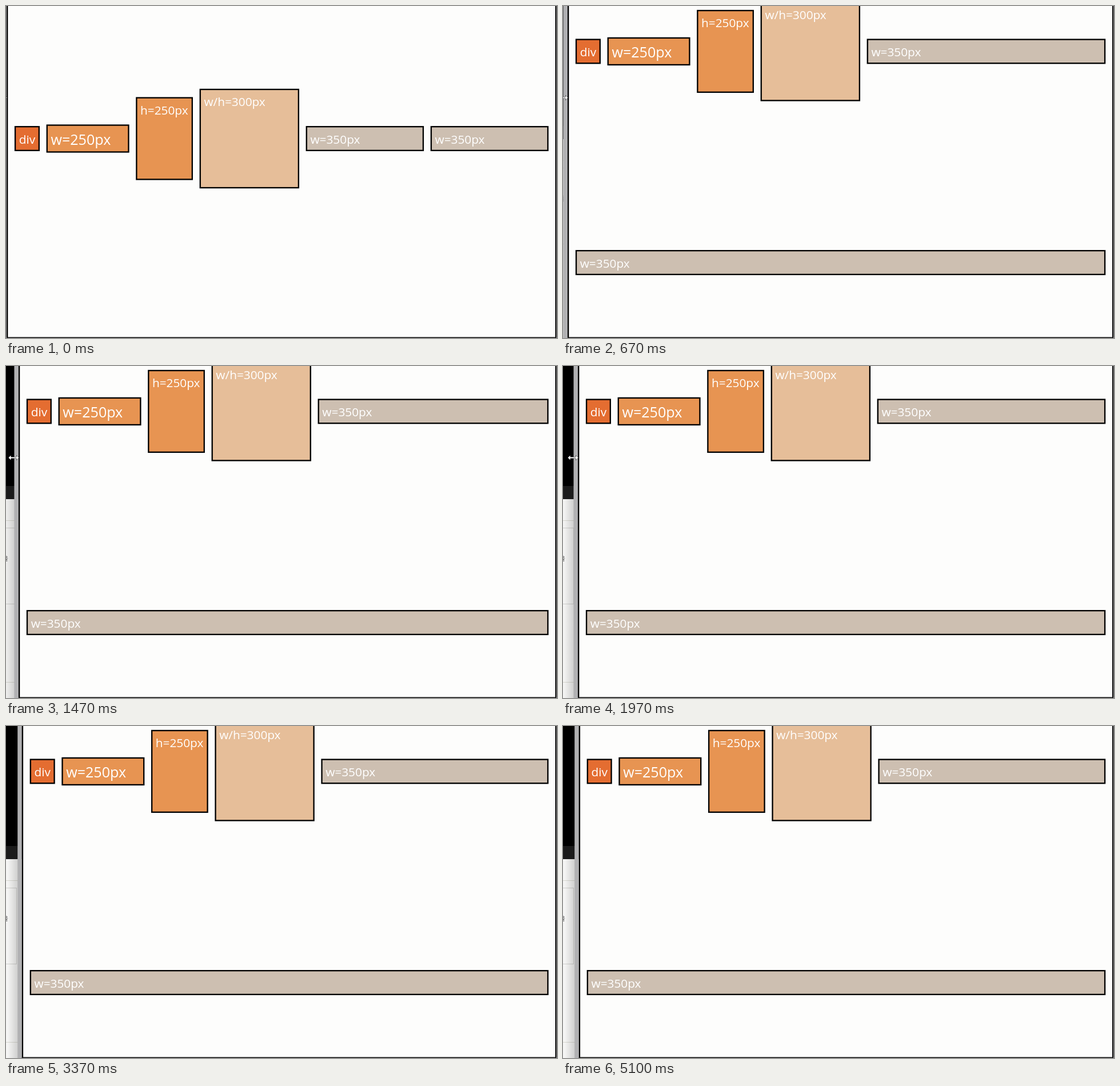
An HTML page with a canvas for the animation above (5.13 s loop, 964 px wide and 581 px high).

```html
<!DOCTYPE html>
<html lang="en">
<head>
<meta charset="utf-8">
<title>Flex wrap while resizing</title>
<style>
html, body { margin: 0; width: 100%; height: 100%; overflow: hidden; background: #fdfdfc }
canvas { display: block }
</style>
</head>
<body>
<canvas id="stage" width="964" height="581"></canvas>
<script>
const ctx = document.getElementById('stage').getContext('2d');
const LOOP = 5130, ZOOM = 0.5815, GAP = 11.6, BORDER = 2.35;
const RIGHT = 949.2, MIN_WIDE = 350 * ZOOM;

// [time in ms, dragged distance in page pixels]
const drag = [[0, 0], [270, 0], [670, 12], [1070, 27], [1470, 36], [1900, 42], [2350, 46], [LOOP, 46]];

const boxes = [
  { label: 'div', w: 44.1, h: 44, color: '#e46d31' },
  { label: 'w=250px', w: 145, h: 49.3, color: '#e79452', big: true },
  { label: 'h=250px', w: 99.8, h: 145.2, color: '#e79452' },
  { label: 'w/h=300px', w: 174.4, h: 174.4, color: '#e6be99' }
];
const wide = { label: 'w=350px', h: 44, color: '#cdbfb1' };

function shiftAt(t) {
  const i = drag.findIndex(p => p[0] > t);
  const [t0, a] = drag[i - 1], [t1, b] = drag[i];
  return Math.round(a + (b - a) * (t - t0) / (t1 - t0)) * ZOOM;
}

function rect(x, y, w, h, color) {
  ctx.fillStyle = color;
  ctx.fillRect(x, y, w, h);
}

function drawBox(box, x, centre, w = box.w) {
  const y = centre - box.h / 2;
  rect(x, y, w, box.h, '#000');
  rect(x + BORDER, y + BORDER, w - 2 * BORDER, box.h - 2 * BORDER, box.color);
  ctx.font = `${box.big ? 25.1 : 20.8}px "Open Sans", "Noto Sans", sans-serif`;
  ctx.fillStyle = '#fff';
  ctx.fillText(box.label, x + 7.8, y + (box.big ? 35.2 : 30.6));
}

// Window behind the one being resized
function drawBackdrop(edge) {
  rect(0, 0, 40, 210, '#000');
  rect(0, 210, 40, 23, '#1b1b1b');
  rect(0, 233, 40, 348, '#fafaf9');
  for (const y of [270, 553]) rect(0, y, 40, 1, '#dcdcd4');
  for (const y of [283, 416]) rect(0, y, 18, 1, '#d5d5d2');
  rect(18, 283, 1, 134, '#d5d5d2');
  ctx.font = '10px "Noto Sans CJK KR", "Noto Sans CJK", sans-serif';
  ctx.fillStyle = '#333';
  ctx.fillText('을', -5.5, 341);
  const shade = ctx.createLinearGradient(edge - 25, 0, edge - 7.5, 0);
  shade.addColorStop(0, 'rgba(0,0,0,.02)');
  shade.addColorStop(1, 'rgba(0,0,0,.17)');
  rect(0, 233, edge, 348, shade);
  rect(edge - 7.5, 0, 7.5, 581, '#b1b1b3');
}

function drawCursor(x, y) {
  ctx.beginPath();
  const half = [[-9, 0], [-5, -4], [-5, -1], [5, -1], [5, -4], [9, 0]];
  for (const [dx, dy] of half) ctx.lineTo(x + dx, y + dy);
  for (const [dx, dy] of half.reverse()) ctx.lineTo(x + dx, y - dy);
  ctx.closePath();
  ctx.lineWidth = 1;
  ctx.strokeStyle = '#000';
  ctx.stroke();
  ctx.fillStyle = '#fff';
  ctx.fill();
}

function draw(t) {
  const shift = shiftAt(t), edge = 1 + shift;
  drawBackdrop(edge);
  rect(edge, 0, 964 - edge, 581, '#fdfdfc');
  rect(edge, 0, BORDER, 581, '#000');
  rect(961, 0, BORDER, 581, '#000');
  rect(edge, 579.4, 963 - edge, 1.6, '#181818');

  const left = 14.9 + shift;
  const used = boxes.reduce((sum, b) => sum + b.w + GAP, left);
  const share = (RIGHT - used - GAP) / 2;
  const wrapped = share < MIN_WIDE;
  const centre = wrapped ? 79.4 : 232;
  let x = left;
  for (const box of boxes) {
    drawBox(box, x, centre);
    x += box.w + GAP;
  }
  if (wrapped) {
    drawBox(wide, x, centre, RIGHT - x);
    drawBox(wide, left, 449, RIGHT - left);
  } else {
    drawBox(wide, x, centre, share);
    drawBox(wide, x + share + GAP, centre, share);
  }
  if (t < 3215) drawCursor(edge - 8.4, 160.5);
}

const start = performance.now();
function tick() {
  draw((performance.now() - start) % LOOP);
  requestAnimationFrame(tick);
}
tick();
</script>
</body>
</html>
```
